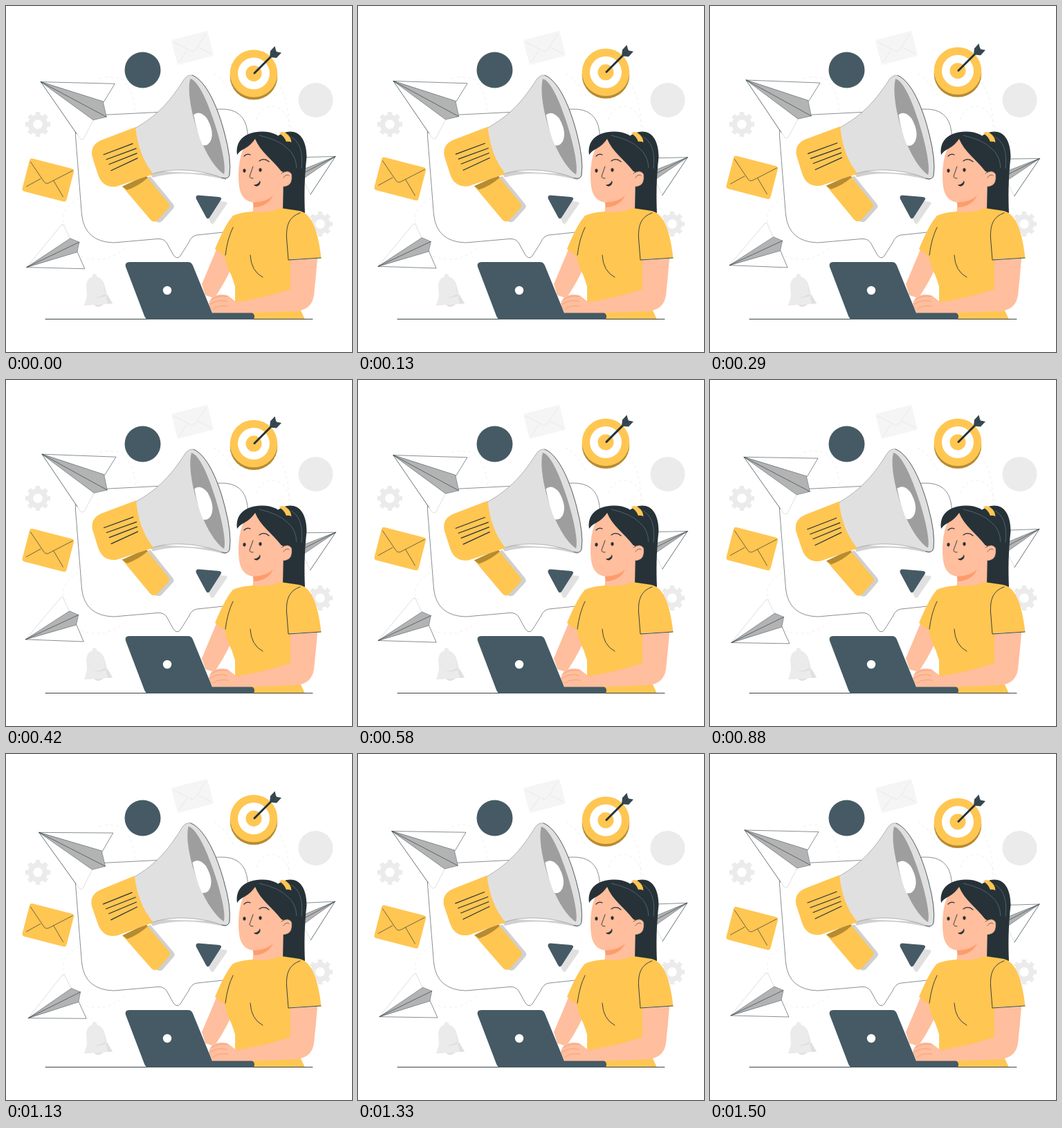
These frames come from a looping animation (500 px wide and 500 px high, 1540 ms). An HTML page:

```html
<!DOCTYPE html>
<html lang="en">
<head>
<meta charset="utf-8">
<title>Marketing illustration</title>
<style>
  html, body { margin: 0; width: 100%; height: 100%; overflow: hidden; background: #fff; }
  svg { display: block; width: 100%; height: 100%; }
  .ink { fill: none; stroke: #263238; stroke-width: .9; stroke-linecap: round; stroke-linejoin: round; }
  .thin { stroke-width: .6; }
  .bold { stroke-width: 1.2; }
  .hand { stroke: #e58f6b; }
  .dash { fill: none; stroke: #ebebeb; stroke-width: .8; stroke-dasharray: 4 4; }
  .paper { fill: #fff; stroke: #263238; stroke-width: .55; stroke-linejoin: round; }
  .faint { fill: #fff; stroke: #bdbdbd; stroke-width: .5; }
  .fold { fill: #b3b3b3; stroke: #455a64; stroke-width: .5; stroke-linejoin: round; }
  .gold { fill: #ffc652; }
  .skin { fill: #ffbe9d; }
  .dark { fill: #263238; }
  .slate { fill: #455a64; }
  .mist { fill: #ebebeb; }
</style>
</head>
<body>
<svg viewBox="0 0 500 500">
  <defs>
    <g id="gear" fill="none" stroke="#ebebeb" transform="rotate(-12)">
      <circle r="10.500" stroke-width="7.500"/>
      <circle r="15.600" stroke-width="5" pathLength="16" stroke-dasharray="1.05 .95"/>
    </g>
    <path id="handle" d="M168 261L202 245L235 285Q238 289 235 292L219 310Q214 314 209 309Z"/>
  </defs>

  <!-- Backdrop -->
  <g class="dash">
    <path d="M135 105Q153 99 169 107Q184 122 187 152"/>
    <path d="M105 278Q74 297 86 318M108 362Q146 375 173 348"/>
    <path d="M300 98Q318 108 330 133M392 110Q412 140 408 184M362 164Q367 146 386 145Q402 148 409 166Q416 190 441 199"/>
  </g>
  <use href="#gear" x="46" y="171"/>
  <use href="#gear" x="454" y="315"/>
  <circle class="mist" cx="447.500" cy="136" r="25"/>
  <circle class="slate" cx="197.500" cy="92.500" r="26"/>
  <g transform="translate(269.500 60.500) rotate(-14.500)">
    <rect x="-27" y="-18.500" width="54" height="37" rx="2" fill="#f5f5f5"/>
    <path d="M-24 -15L-3 4Q0 6 3 4L24 -15M-24 15L-8 1M24 15L8 1" fill="none" stroke="#e6e6e6" stroke-width=".8"/>
  </g>
  <g class="mist">
    <path d="M113 433L117 419L116 405Q116 394 125 391Q124 387 128 387Q132 388 131 391Q141 394 143 405L146 416L154 430Z"/>
    <path d="M127 432Q133 438 141 431Z" fill="#e0e0e0"/>
    <path d="M140 401L144 414Q141 420 126 421Q139 423 146 417L154 430L147 430.500" fill="#e0e0e0"/>
  </g>

  <path class="paper" d="M100.500 188Q98 160 128 158L310 149Q345 148 349 182L361 322L276 331Q268 332 264 342L252 361Q247 367 242 360L232 342Q228 336 219 336.500L156 342Q114 341 109.500 302Z"/>

  <g class="sway">
    <path class="faint" d="M50 110L105 189Q108 195 112 192L126 165Z"/>
    <path class="ink thin" d="M50 110L102 185"/>
    <path class="paper" d="M50 110L157 112.500L141 139Z"/>
    <path class="fold" d="M50 110L140 138L145 160.500L126 165Z"/>
    <path class="ink thin" d="M50 110L145 160.500"/>

    <path class="faint" d="M30 378L80 317L83 316L93 337Z"/>
    <path class="paper" d="M30 378L103 355L114 380Z"/>
    <path class="fold" d="M30 378L93 336L106 341.500L103 356Z"/>
    <path class="ink thin" d="M30 378L106 341.500"/>

    <path class="paper" d="M476 217L425 218.500L431 236Z"/>
    <path class="faint" d="M476 217L440 272L428 248Z"/>
    <path class="ink thin" d="M476 217L440 272"/>
    <path class="fold" d="M476 217L431 235L425 240L430 249Z"/>
    <path class="ink thin" d="M476 217L428 242"/>
  </g>

  <!-- Megaphone -->
  <g class="sway">
    <use href="#handle" x="6.500" y="1" fill="#d0d0d0"/>
    <path d="M205 238L318 243V251Q255 235 212 248Z" fill="#d0d0d0"/>
    <use href="#handle" class="gold"/>
    <path d="M168 261L202 245L205 248Q192 260 175 266Z" fill="#b68b32"/>
    <path d="M184 178C221 158 240 133 257 106Q262 99 269 100C289 108 306 146 316 185Q326 222 323 244Q321 251 312 248C281 236 239 233 211 243L196 240Z" fill="#e0e0e0" stroke="#8c8c8c" stroke-width=".6"/>
    <path d="M266 105C258 135 283 221 315 243C319 232 309 190 298 160C289 133 276 107 266 105Z" fill="#9e9e9e"/>
    <path d="M271 157Q280 150 290 162Q301 181 296 194Q292 203 284 201Q276 184 271 157Z" fill="#fff"/>
    <path class="ink thin" d="M269 100C289 108 306 146 316 185Q326 222 323 244Q321 251 312 248"/>
    <path class="gold" d="M187 175L138 194Q121 201 124.500 218L133 244Q140 264 160 261L213 243Q191 216 187 175Z"/>
    <path class="ink bold" d="M141 215L183 199M145 222L188 206M149 229L189 213M152 238L190 220"/>
  </g>

  <path d="M284 280Q302 281 318 283Q321 285 318 288L300 314Q297 317 295 312Z" fill="#e0e0e0"/>
  <path class="slate" d="M278 273.500L308 276Q313 277 310 281L294 306Q291 309 289 305L275 279Q273 274 278 273.500Z"/>

  <g class="float">
    <g transform="translate(60.800 251.500) rotate(14.500)">
      <rect class="gold" x="-33" y="-24.500" width="66" height="49" rx="4"/>
      <path class="ink thin" d="M-31 -19L-5 4Q-1 7 3 3L31 -22M-28 17L-11 1M8 -1L27 18"/>
    </g>
    <ellipse cx="358" cy="102" rx="34.300" ry="33.500" fill="#b68b32"/>
    <circle class="gold" cx="358" cy="97.500" r="34.300"/>
    <circle cx="358" cy="97.500" r="23" fill="#fff"/>
    <circle class="gold" cx="358" cy="97.500" r="11.500"/>
    <path d="M359 97L388 68" fill="none" stroke="#263238" stroke-width="3" stroke-linecap="round"/>
    <path d="M381 74L382 65L388.500 58L390.500 66L398 67.500L391 75Z" fill="#37474f"/>
    <path class="ink thin" d="M383 73L391 65"/>
  </g>

  <!-- Woman -->
  <path class="dark" d="M390 190C410 174 434 179 434.500 218C431 250 431 276 432 299L396 294L397 240Z"/>
  <path class="skin" d="M347 198C338 213 334 236 337 261Q340 282 358 284L356 302Q380 306 400 296L401 250L397 215L361 188Z"/>
  <path d="M358 284Q376 283 386 274Q378 290 358 291Z" fill="#ff9b6b"/>
  <path class="dark" d="M334 215C331 194 346 182 369 181.500C401 181 415 205 413 242L398 239C383 220 368 211 360 192Q354 201 345 206Q338 209 334 215Z"/>
  <path class="gold" d="M395 184Q399 180 405 184Q412 189 412.500 197Q408 195 405 196Q402 188 395 184Z"/>
  <path class="skin" d="M398 242Q408 235 413 243Q415 260 402 261L397 259Z"/>
  <path class="ink thin" d="M398 242Q408 235 413 243Q415 259 404 261M401 248Q405 242 409 245"/>
  <path d="M366 187Q394 193 407 206Q419 216 420 234M412 189Q431 200 427 235" fill="none" stroke="#78909c" stroke-width=".5"/>
  <path class="ink bold" d="M344 217Q348 212.500 353 215M366 224Q373 219 380 225"/>
  <path class="ink" d="M357 232L352 246Q352 249 357 249"/>
  <ellipse class="dark" cx="344.500" cy="238" rx="2.100" ry="2.700"/>
  <ellipse class="dark" cx="367.500" cy="237" rx="2.100" ry="2.700"/>
  <path class="dark" d="M358 258.500Q365 258 367 252Q369 258 363 260.500Q360 261 358 258.500Z"/>

  <path class="skin" d="M304 352L283 402L288 418L301 422Q315 402 324 382L317 358Z"/>
  <path class="gold" d="M357 297Q339 298 328 303Q317 315 302 351L316 362Q319 377 326 390L331 405V453H432L412 410V366L455.500 364C451 325 442 300 424 296L397 292Q378 300 357 297Z"/>
  <path class="skin" d="M411 367L450 365Q448 390 445 418Q442 438 421 441L345 444H299L296 438Q290 430 297 422Q305 415 320 418L333 428Q380 420 411 409Z"/>
  <path class="ink" d="M328 320Q320 336 317 360M353 360Q354 383 371 392M425 299C408 305 405 318 405.500 335L408 367L455 364"/>
  <path class="ink thin hand" d="M297 424Q308 417 320 420M295 431Q307 423 319 427M299 438Q309 431 321 434"/>

  <!-- Laptop and desk -->
  <path class="ink" d="M57 452.500H443"/>
  <path class="slate" d="M179 370H263Q268 370 270 375L298 443.500H355Q359 444 359 449Q359 453 355 453H206Q202 453 200 448L173 377Q171 370 179 370Z"/>
  <circle cx="233" cy="411" r="6.200" fill="#fff"/>
</svg>
<script>
  const LOOP = 1540, LEAD = 40, TILT = 1, LIFT = 10;
  const swaying = document.querySelectorAll('.sway');
  const floating = document.querySelector('.float');

  // Triangle wave: 0 at the start, 1 at mid-cycle, 0 at the end.
  const triangle = p => 1 - Math.abs(2 * (p - Math.floor(p)) - 1);

  function draw(now) {
    const phase = (now + LEAD) / LOOP;
    const tilt = TILT * (2 * triangle(phase + .25) - 1);
    swaying.forEach(el => el.setAttribute('transform', `rotate(${tilt} 250 250)`));
    floating.setAttribute('transform', `translate(0 ${.5 - LIFT * triangle(phase)})`);
  }

  const start = performance.now();
  function tick() {
    draw(performance.now() - start);
    requestAnimationFrame(tick);
  }
  tick();
</script>
</body>
</html>
```
